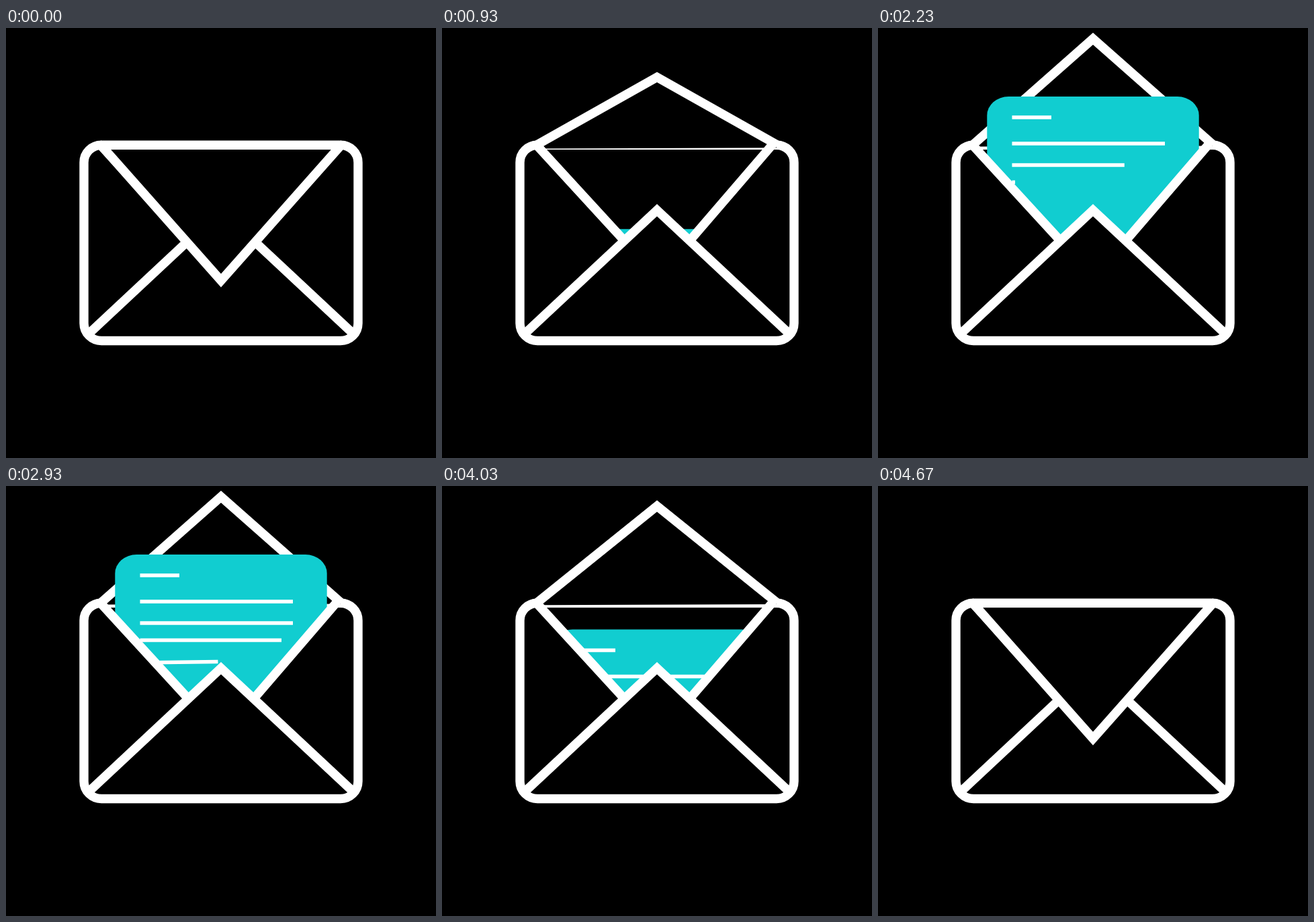
Recreate the animation shown at these times as an HTML page with a canvas. Size 640 px wide and 640 px high, loop 5.13 s.

```html
<!DOCTYPE html>
<html lang="en">
<head>
<meta charset="utf-8">
<title>Envelope</title>
<style>
html, body { margin: 0; width: 100%; height: 100%; overflow: hidden; background: #000; }
canvas { display: block; }
</style>
</head>
<body>
<canvas id="stage" width="640" height="640"></canvas>
<script>
const ctx = document.getElementById('stage').getContext('2d');
const LOOP = 5130, WHITE = '#fff', BLACK = '#000', TEAL = '#11cdd0';

// Text lines on the letter: offsets from its top, right end, start and end time
const LINES = [
  { y: 31, x: 258, from: 1140, to: 1728 },
  { y: 70, x: 427, from: 1500, to: 2040 },
  { y: 102, x: 427, from: 1820, to: 2500 },
  { y: 127.5, x: 410, from: 2130, to: 2850 },
  { y: 161, endY: 159.4, x: 377, from: 2490, to: 3272 }
];

const FRAME = new Path2D('M142 174.2A26 26 0 0 0 116 200.2V439.5A26 26 0 0 0 142 465.5' +
  'H498A26 26 0 0 0 524 439.5V200.2A26 26 0 0 0 498 174.2');
const TOP = new Path2D('M141 174.2H499');
const SIDES = new Path2D('M141 174.5L269 314M491 174.5L370.5 314.5');
const POCKET = new Path2D('M122 456.2L320 271.2L518 456.2');
const OPENING = new Path2D('M0 0H640V174.5H491L369.5 316H270.5L141 174.5H0Z');

// Symmetric cubic-bezier(p, 0, 1 - p, 1) between two times
function ease(t, from, to, p = 0.6) {
  const x = Math.min(1, Math.max(0, (t - from) / (to - from)));
  let lo = 0, hi = 1;
  for (let i = 0; i < 24; i++) {
    const s = (lo + hi) / 2, r = 1 - s;
    if (3 * p * s * r * r + 3 * (1 - p) * s * s * r + s ** 3 < x) lo = s; else hi = s;
  }
  return lo * lo * (3 - 2 * lo);
}

function stroke(path, width = 13.4) {
  ctx.lineWidth = width;
  ctx.strokeStyle = WHITE;
  ctx.stroke(path);
}

function fill(path, color) {
  ctx.fillStyle = color;
  ctx.fill(path);
}

function drawFlap(tip) {
  // The open flap hides most of the top edge behind it
  const base = Math.min(181, 176 + (tip - 16) * 0.05);
  const tilt = tip < 174 ? 0.6 : 0;
  fill(new Path2D(`M141 ${base + tilt}L320 ${tip}L499 ${base - tilt}Z`), BLACK);
  stroke(new Path2D(`M141 174L320 ${tip}L499 174`));
}

function drawLetter(t, top) {
  ctx.save();
  ctx.clip(OPENING);
  ctx.fillStyle = TEAL;
  ctx.beginPath();
  ctx.roundRect(162.3, top, 315.4, 240, { x: 32, y: 28 });
  ctx.fill();
  for (const { y, endY = y, x, from, to } of LINES) {
    const k = ease(t, from, to);
    if (k > 0.001) stroke(new Path2D(`M199.5 ${top + y}L${199.5 + (x - 199.5) * k} ${top + endY}`), 5.5);
  }
  ctx.restore();
}

function draw(now) {
  const t = now % LOOP;
  const open = ease(t, 406, 1186) - ease(t, 3890, 4668);
  const raised = ease(t, 687, 1557, 0.7) - ease(t, 3590, 4462, 0.7);
  const tip = 376 - 360 * open;

  ctx.fillStyle = BLACK;
  ctx.fillRect(0, 0, 640, 640);
  stroke(TOP);
  if (tip < 174) drawFlap(tip);
  drawLetter(t, 317 - 215 * raised);
  stroke(SIDES);
  fill(POCKET, BLACK);
  stroke(POCKET);
  if (tip >= 174) drawFlap(tip);
  stroke(FRAME);
  requestAnimationFrame(draw);
}
requestAnimationFrame(draw);
</script>
</body>
</html>
```
